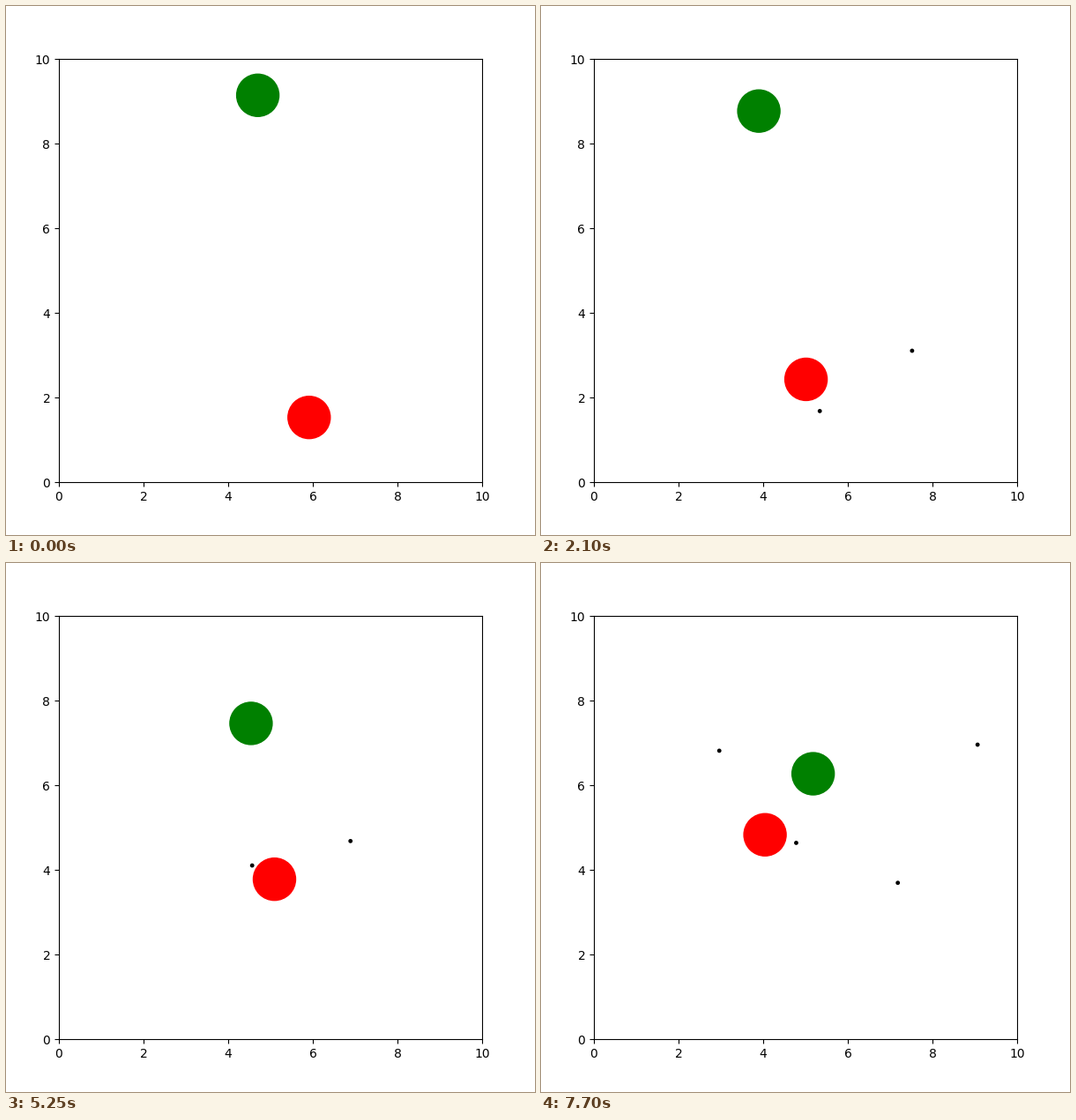
Write a matplotlib script that moves like this. It is 600 px wide and 600 px high and loops after 8 s.

```python
import numpy as np
import matplotlib.pyplot as plt
from matplotlib.animation import FuncAnimation

TICK = 50            # ms per drawn frame
HOLD = 7             # drawn frames per simulation step
FRAMES = 160

RED_START = np.array([5.9125, 1.528])
RED_SPEED = 0.15                        # per step, along each axis
RED_TURNS = [6.96, 10, 12.27, 14]       # steps at which it swaps left and right

SHOT_SPEED = 0.45
SHOT_EVERY = 4
SHOT_ANGLES = np.radians([44.46, -86.8, 46.3, 120.6, -6, 14])

# Waypoints of the green robot: step, x, y
GREEN = np.array([
    (0, 4.70, 9.14), (1, 4.48, 8.90), (5, 3.81, 8.87), (9, 4.16, 8.46),
    (10, 4.34, 8.25), (13, 4.22, 7.90), (15, 4.54, 7.46), (18, 5.00, 6.83),
    (20, 5.14, 6.47), (22, 5.18, 6.27),
]).T


def red_pos(k):
    """Steady climb with a sideways zigzag that starts to the left."""
    left = k
    for n, turn in enumerate(RED_TURNS):
        left -= 2 * (-1) ** n * max(k - turn, 0)
    return RED_START + RED_SPEED * np.array([-left, k])


def green_pos(k):
    steps, x, y = GREEN
    return np.interp(k, steps, x), np.interp(k, steps, y)


def shot_pos(n, k):
    """Shot n leaves from where red stood one step before it shows."""
    fired = n * SHOT_EVERY
    a = SHOT_ANGLES[n]
    way = SHOT_SPEED * (k - fired - 1)
    return red_pos(fired) + way * np.array([np.cos(a), np.sin(a)])


fig = plt.figure(figsize=(6, 6), dpi=100)
ax = fig.add_axes([0.1, 0.1, 0.8, 0.8])
ax.set_xlim(0, 10)
ax.set_ylim(0, 10)


def disc(radius, color, **style):
    return ax.add_patch(plt.Circle((0, 0), radius, color=color, **style))


red = disc(0.5, "red")
green = disc(0.5, "green")
shots = [disc(0.05, "black", lw=0, zorder=2) for _ in SHOT_ANGLES]


def update(i):
    k = i // HOLD
    red.center = red_pos(k)
    green.center = green_pos(k)
    for n, shot in enumerate(shots):
        shot.set_visible(k > n * SHOT_EVERY)
        shot.center = shot_pos(n, k)
    return red, green, *shots


anim = FuncAnimation(fig, update, frames=FRAMES, interval=TICK,
                     repeat=True, repeat_delay=0)
plt.show()
```
